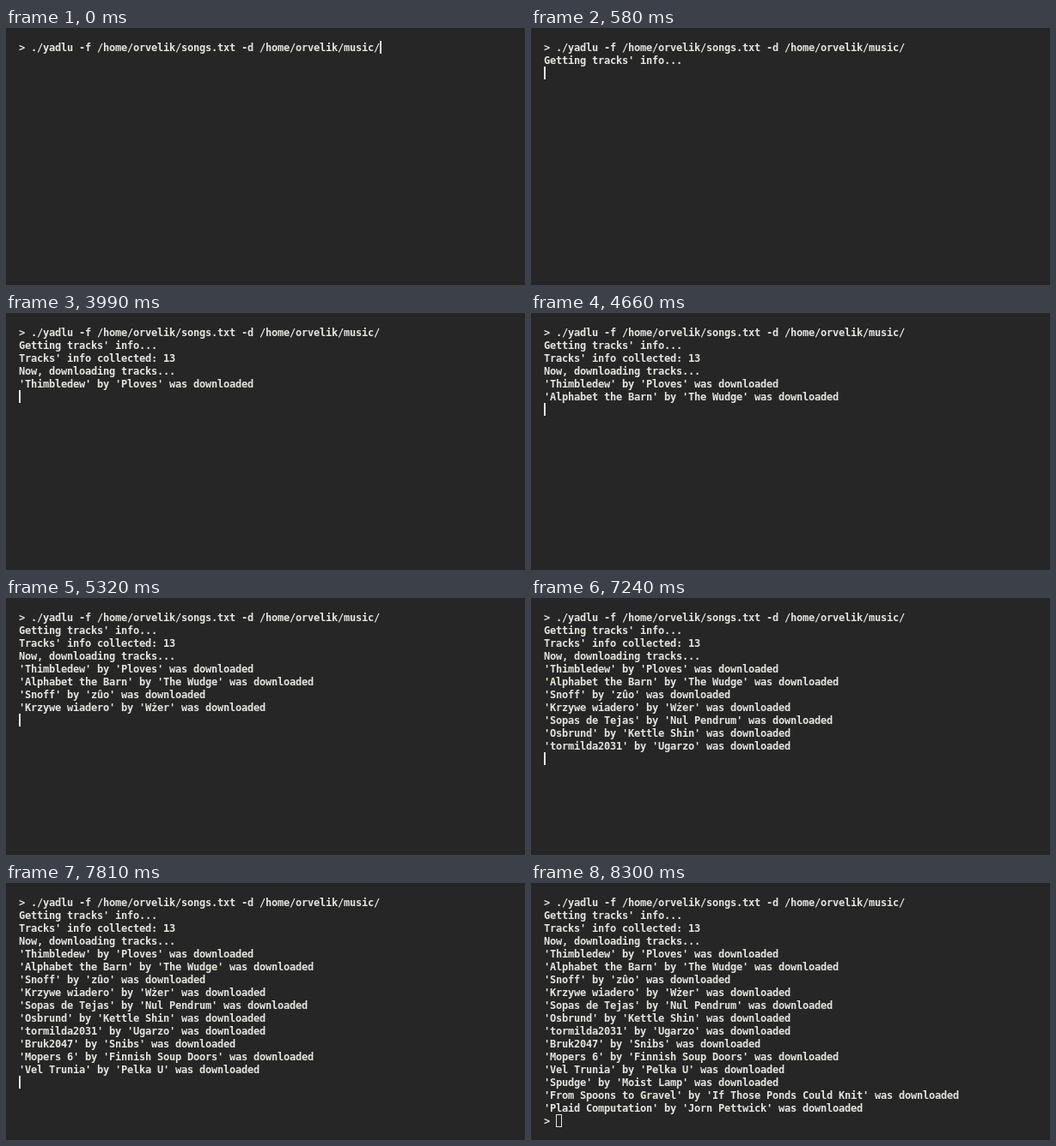
An HTML page for the animation above (9300 ms loop, 604x300 px).

```html
<!DOCTYPE html>
<html lang="en">
<head>
<meta charset="utf-8">
<title>Terminal session</title>
<style>
  html, body { margin: 0; width: 100%; height: 100%; overflow: hidden; background: #262626; }
  svg { display: block; width: 604px; height: 300px; }
  text { font: bold 12px "DejaVu Sans Mono", monospace; fill: #e6e4dd; white-space: pre; }
  #bar { fill: #e6e4dd; }
  #box { fill: none; stroke: #e6e4dd; }
</style>
</head>
<body>
<svg id="stage" viewBox="0 0 604 300" xmlns="http://www.w3.org/2000/svg">
  <rect id="bar" width="2" height="15"/>
  <rect id="box" width="6" height="14"/>
</svg>
<script>
const LEFT = 15, TOP = 15, COL = 7, ROW = 15, ASCENT = 12, LOOP = 9300;

const tracks = [
  ["Thimbledew", "Ploves"],
  ["Alphabet the Barn", "The Wudge"],
  ["Snoff", "zûo"],
  ["Krzywe wiadero", "Wżer"],
  ["Sopas de Tejas", "Nul Pendrum"],
  ["Osbrund", "Kettle Shin"],
  ["tormilda2031", "Ugarzo"],
  ["Bruk2047", "Snibs"],
  ["Mopers 6", "Finnish Soup Doors"],
  ["Vel Trunia", "Pelka U"],
  ["Spudge", "Moist Lamp"],
  ["From Spoons to Gravel", "If Those Ponds Could Knit"],
  ["Plaid Computation", "Jorn Pettwick"]
];

const lines = [
  "> ./yadlu -f /home/orvelik/songs.txt -d /home/orvelik/music/",
  "Getting tracks' info...",
  "Tracks' info collected: 13",
  "Now, downloading tracks...",
  ...tracks.map(([title, artist]) => `'${title}' by '${artist}' was downloaded`),
  "> "
];

// [start in ms, printed lines, cursor row, cursor column]
const steps = [
  [0, 1, 0, 60],
  [580, 2, 2, 0],
  [1830, 4, 4, 0],
  [3990, 5, 5, 0],
  [4660, 6, 6, 0],
  [5320, 8, 8, 0],
  [7240, 11, 11, 0],
  [7410, 12, 12, 0],
  [7730, 13, 13, 0],
  [7810, 14, 14, 0],
  [7890, 16, 16, 0],
  [8220, 17, 17, 0],
  [8300, 18, 17, 2]
];

const stage = document.getElementById("stage");
const bar = document.getElementById("bar");
const box = document.getElementById("box");

// Each character sits on the terminal's whole-pixel grid.
const rows = lines.map((line, row) => {
  const el = document.createElementNS(stage.namespaceURI, "text");
  el.setAttribute("x", Array.from(line, (_, i) => LEFT + i * COL).join(" "));
  el.setAttribute("y", TOP + row * ROW + ASCENT);
  el.textContent = line;
  return stage.insertBefore(el, bar);
});

const show = (el, on) => { el.style.visibility = on ? "visible" : "hidden"; };

function place(el, x, y) {
  el.setAttribute("x", x);
  el.setAttribute("y", y);
}

let current = -1;
function draw(time) {
  const index = steps.findLastIndex(([start]) => start <= time);
  if (index === current) return;
  current = index;
  const [, count, row, col] = steps[index];
  const x = LEFT + col * COL, y = TOP + row * ROW;
  const idle = count === lines.length;
  rows.forEach((el, i) => show(el, i < count));
  show(bar, !idle);
  show(box, idle);
  place(bar, x, y);
  place(box, x + 0.5, y + 0.5);
}

const begin = performance.now();
function tick() {
  draw((performance.now() - begin) % LOOP);
  requestAnimationFrame(tick);
}
tick();
</script>
</body>
</html>
```
